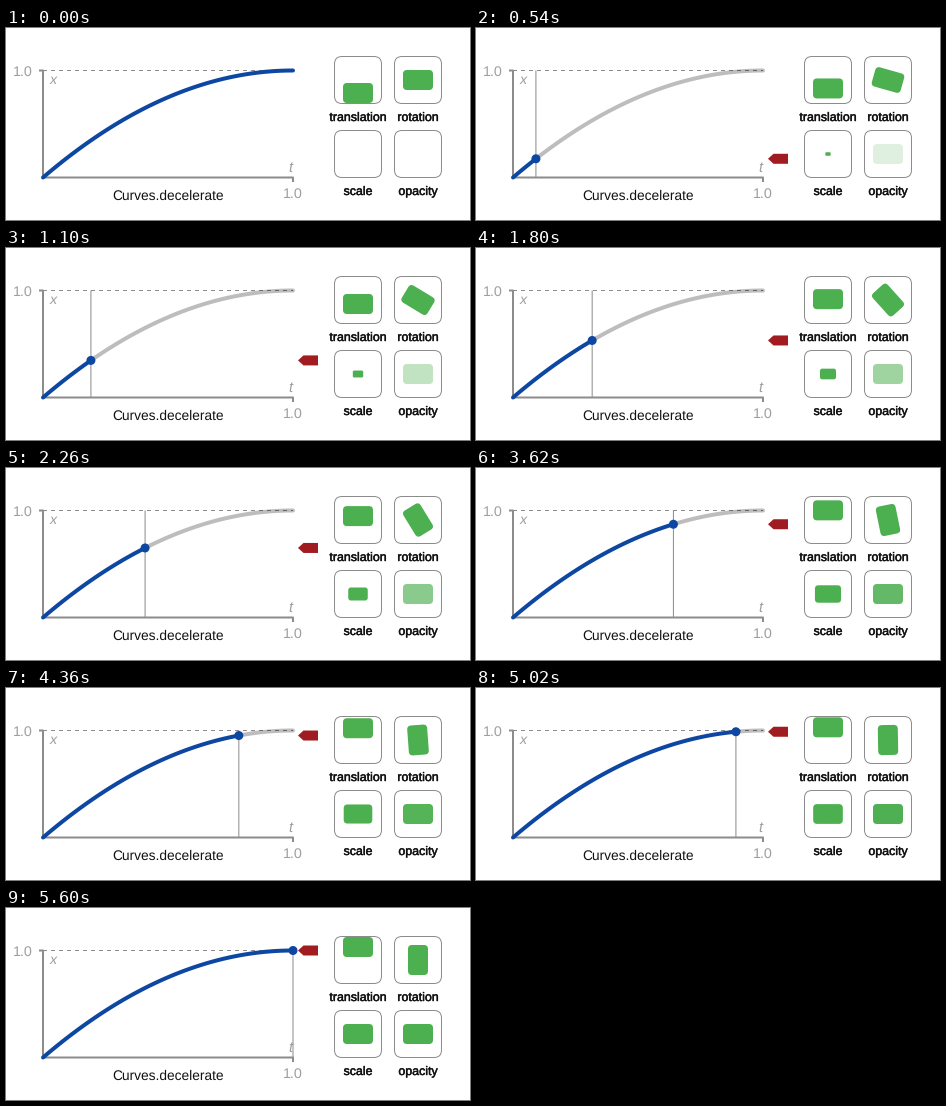
Animation of 464 by 192 pixels, one loop 5.62 s. Source, as a matplotlib script:

```python
import numpy as np
import matplotlib.pyplot as plt
from matplotlib.animation import FuncAnimation
from matplotlib.patches import Circle, FancyBboxPatch, Polygon
from matplotlib.patheffects import withStroke
from matplotlib.transforms import Affine2D

W, H, DPI = 464, 192, 64
PT = 72 / DPI  # points per pixel
TICK = 20      # ms
STEPS = 120
LEFT, RIGHT, TOP, BOTTOM = 37, 287, 42.5, 149.5

BLUE, GREEN, RED = "#0d47a1", "#4caf50", "#a01c20"
INK, AXIS, LABEL = "#111111", "#8c8c8c", "#9e9e9e"
FAINT = (0, 0, 0, 0.26)

plt.rcParams["font.family"] = "Liberation Sans"
plt.rcParams["text.hinting"] = "none"

fig = plt.figure(figsize=(W / DPI, H / DPI), dpi=DPI, facecolor="white")
ax = fig.add_axes([0, 0, 1, 1])
ax.set(xlim=(0, W), ylim=(H, 0))
ax.axis("off")


def decelerate(t):
    return 1 - (1 - t) ** 2


def to_xy(t):
    return LEFT + (RIGHT - LEFT) * t, BOTTOM - (BOTTOM - TOP) * decelerate(t)


def line(xs, ys, color, width, z, cap="butt"):
    return ax.plot(xs, ys, color=color, lw=width * PT, zorder=z, snap=False,
                   solid_capstyle=cap, solid_joinstyle="round")[0]


def label(x, y, text, size, color=INK, **kw):
    return ax.text(x, y, text, fontsize=size * PT, color=color, ha="center",
                   va="baseline", zorder=2, **kw)


def round_box(x, y, w, h, radius, **kw):
    style = f"round,pad=0,rounding_size={radius}"
    return ax.add_patch(FancyBboxPatch((x, y), w, h, boxstyle=style, **kw))


def block():
    return round_box(-15, -10, 30, 20, 4, fc=GREEN, ec="none", zorder=4)


def place(patch, cx, cy, angle=0, scale=1):
    move = Affine2D().scale(scale).rotate_deg(angle).translate(cx, cy)
    patch.set_transform(move + ax.transData)


# Chart
line([LEFT - 4, LEFT, LEFT], [TOP, TOP, BOTTOM], AXIS, 2, 1)
line([LEFT, RIGHT, RIGHT], [BOTTOM, BOTTOM, BOTTOM + 4.5], AXIS, 2, 1)
for x in range(LEFT, RIGHT, 8):
    line([x, min(x + 4, RIGHT)], [TOP, TOP], AXIS, 1, 1)
label(17, 47.7, "1.0", 14.3, LABEL)
label(287, 169.8, "1.0", 14.3, LABEL)
label(47, 55.5, "x", 14.3, LABEL, style="italic")
label(284.2, 144, "t", 14.8, LABEL, style="italic")
label(162, 172, "Curves.decelerate", 13.8)

# Tiles, with names slightly heavier than regular
medium = [withStroke(linewidth=0.45 * PT, foreground=INK)]
for cx, cy, name in [(352, 52, "translation"), (412, 52, "rotation"),
                     (352, 126, "scale"), (412, 126, "opacity")]:
    round_box(cx - 23.5, cy - 23.5, 47, 47, 7.5, fc="white", ec=AXIS,
              lw=PT, zorder=3)
    label(cx, cy + 41, name, 12.4, path_effects=medium)

# Moving parts
rest = line([], [], FAINT, 4, 3, "round")
marker = line([], [], AXIS, 1, 4)
done = line([], [], BLUE, 4, 5, "round")
dot = ax.add_patch(Circle((0, 0), 4.5, fc=BLUE, ec="none", zorder=6))
arrow = ax.add_patch(Polygon([(0, 0), (1, 1), (1, 0)], fc=RED, ec="none",
                             zorder=5))
slide, spin, grow, fade = (block() for _ in range(4))


def step_at(tick):
    # Three steps per 140 ms, held for 20, 100 and 20 ms.
    group, r = divmod(tick, 7)
    return 3 * group + (r > 0) + (r == 6)


def update(tick):
    step = step_at(tick)
    t = step / STEPS
    v = decelerate(t)
    running = step > 0
    x, y = to_xy(t)

    done.set_data(*to_xy(np.linspace(0, t if running else 1, 100)))
    rest.set_data(*to_xy(np.linspace(t, 1, 100)))
    marker.set_data([x, x], [TOP, BOTTOM])
    dot.center = x, y
    arrow.set_xy([(292, y), (297.5, y - 5), (312, y - 5),
                  (312, y + 5), (297.5, y + 5)])
    for part in (rest, marker, dot, arrow, grow, fade):
        part.set_visible(running)

    place(slide, 352, 65 - 26 * v)
    place(spin, 412, 52, angle=90 * v)
    place(grow, 352, 126, scale=v if running else 1)
    place(fade, 412, 126)
    fade.set_alpha(v)
    return rest, marker, done, dot, arrow, slide, spin, grow, fade


anim = FuncAnimation(fig, update, frames=281, interval=TICK, repeat=True,
                     repeat_delay=0, blit=False)
plt.show()
```
